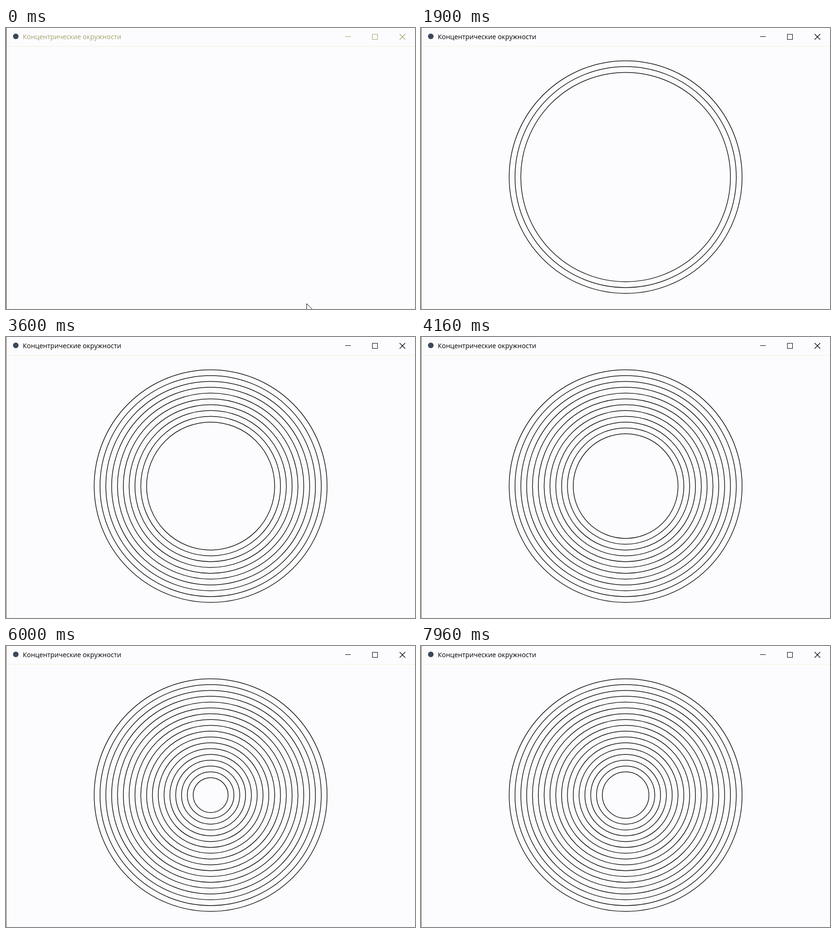
These frames come from a looping animation (878 px wide and 604 px high, 8 s). An HTML page with a canvas:

```html
<!DOCTYPE html>
<html lang="ru">
<head>
<meta charset="utf-8">
<title>Концентрические окружности</title>
<style>
  html, body { margin: 0; width: 100%; height: 100%; overflow: hidden; background: #fcfcfe; }
  canvas { position: absolute; left: 0; top: 0; }
  #title {
    position: absolute; left: 36px; top: 9px;
    font: 14.3px/20px "Open Sans", "Noto Sans", sans-serif;
    white-space: nowrap;
  }
</style>
</head>
<body>
<canvas id="stage" width="878" height="604"></canvas>
<div id="title">Концентрические окружности</div>
<script>
const W = 878, H = 604, LOOP = 8000;
const CX = 439.3, CY = 320.4, R_MAX = 250, R_STEP = 12.5;
const BACK = '#fcfcfe', INK = '#1a1a18';
const DRAW_TIMES = [1160, 1430, 1730, 2000, 2290, 2560, 2830, 3100, 3330, 3600, 3860,
                    4130, 4400, 4670, 4960, 5230, 5500, 5760, 6030, 6300, 6730];
const ERASE_TIMES = [7100, 7400, 7700, 7960];

const ctx = document.getElementById('stage').getContext('2d');
const title = document.getElementById('title');
const clamp01 = v => Math.max(0, Math.min(1, v));
const countPassed = (times, t) => times.filter(x => x <= t).length;
const mix = (a, b, k) => `rgb(${a.map((v, i) => Math.round(v + (b[i] - v) * k)).join()})`;

function line(...pts) {
  ctx.beginPath();
  pts.forEach(([x, y]) => ctx.lineTo(x, y));
  ctx.stroke();
}

function disc(x, y, r) {
  ctx.beginPath();
  ctx.arc(x, y, r, 0, Math.PI * 2);
}

function drawWindow(active, color) {
  ctx.fillStyle = BACK;
  ctx.fillRect(0, 0, W, H);

  ctx.fillStyle = mix([36, 36, 24], [96, 96, 72], active);
  ctx.fillRect(0, 0, 1, H);
  ctx.fillStyle = '#f0f0dc';
  ctx.fillRect(1, 39, W, 1);
  ctx.fillStyle = '#f4f4ee';
  ctx.fillRect(1, 603, W, 1);

  ctx.fillStyle = '#3c4858';
  disc(21, 18, 6);
  ctx.fill();

  ctx.strokeStyle = color;
  ctx.lineWidth = 1;
  line([728, 18.5], [740, 18.5]);
  ctx.strokeRect(786.5, 13.5, 11, 11);
  ctx.lineWidth = 1.2;
  line([845, 13], [857, 25]);
  line([857, 13], [845, 25]);
}

function drawRings(count) {
  ctx.strokeStyle = ctx.fillStyle = INK;
  ctx.lineWidth = 1.5;
  for (let i = 0; i < count; i++) {
    const r = R_MAX - i * R_STEP;
    disc(CX, CY, r || 1);
    if (r) ctx.stroke();
    else ctx.fill();
  }
}

function drawCursor(x, y) {
  ctx.beginPath();
  [[0, 0], [0, 17], [4, 13], [7, 19], [9, 18], [6, 12], [12, 12]]
    .forEach(([dx, dy]) => ctx.lineTo(x + dx + 0.5, y + dy + 0.5));
  ctx.closePath();
  ctx.lineWidth = 1;
  ctx.fillStyle = '#fff';
  ctx.fill();
  ctx.strokeStyle = '#000';
  ctx.stroke();
}

function render(t) {
  const active = clamp01((t - 20) / 180);
  const color = mix([162, 162, 108], [0, 0, 0], active);
  title.style.color = color;
  drawWindow(active, color);
  drawRings(countPassed(DRAW_TIMES, t) - countPassed(ERASE_TIMES, t));
  if (t < 200) drawCursor(645, 592 + 14 * clamp01((t - 30) / 150));
}

const start = performance.now();
function tick() {
  render((performance.now() - start) % LOOP);
  requestAnimationFrame(tick);
}
tick();
</script>
</body>
</html>
```
